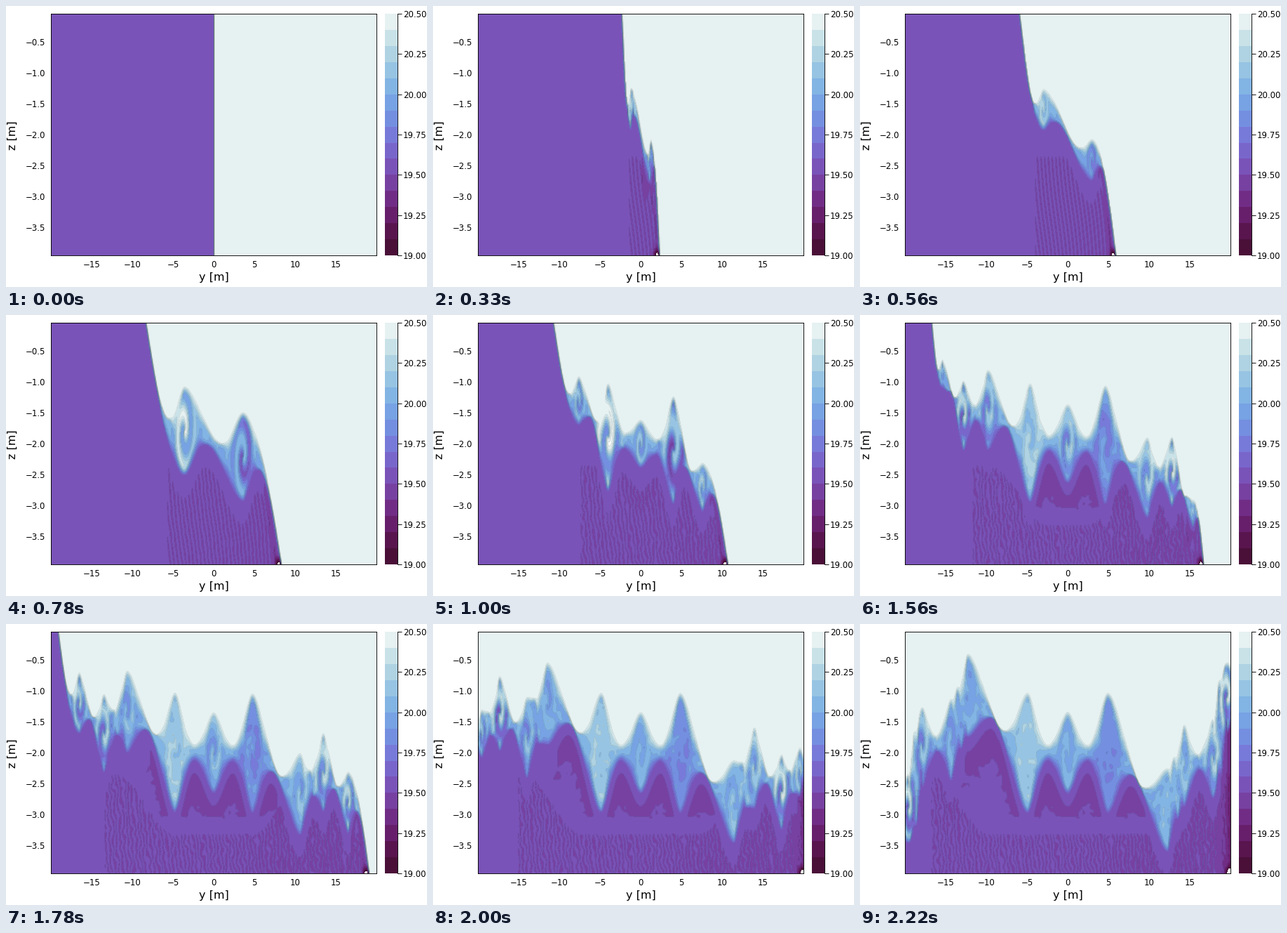
Write a matplotlib script that moves like this. It is 600 px wide and 400 px high and loops after 2330 ms.

```python
import numpy as np
import matplotlib.pyplot as plt
from matplotlib.animation import FuncAnimation
from matplotlib.colors import ListedColormap

FRAMES, LOOP = 21, 2330
W, H, DPI = 600, 400, 100
X0, X1, Y0, Y1 = 64, 528, 11, 355          # plot box in pixels
XC, YC = 296, 183.5                        # centre of point symmetry
SPEED = 13.9                               # front speed, px per frame

bands = ("#4a1038 #59154e #681f6b #712d86 #7741a1 #7a53b8 #7966cb #787ad9 "
         "#748fe0 #77a2e3 #82b4e4 #97c4e3 #afd3e2 #c9e2e8 #e6f1f1").split()
cmap = ListedColormap(bands)
levels = np.linspace(19, 20.5, 16)

# Billows shed by the left front, oldest first; the right ones mirror them.
# drift speed, slow-down time, rise at birth, settled rise, late lift, lift start
billows = [
    (4.0, 6, 36, 0, 0, 20),
    (5.3, 90, 68, 45, 6, 14),
    (7.5, 6, 83, 15, 0, 20),
    (7.5, 6, 100, 40, -20, 18),
    (0.0, 6, 80, 80, -53, 17),
]

xs = np.linspace(X0, X1, 330)
ys = np.linspace(Y0, Y1, 180)
X, Y = np.meshgrid(xs, ys)


def blur(f, passes):
    for _ in range(passes):
        p = np.pad(f, 1, mode="edge")
        f = (p[:-2, 1:-1] + p[2:, 1:-1] + p[1:-1, :-2] + p[1:-1, 2:] + 4 * f) / 8
    return f


grain = blur(np.random.default_rng(4).normal(size=X.shape), 12)
grain /= grain.std()


def smooth(t):
    t = np.clip(t, 0, 1)
    return t * t * (3 - 2 * t)


def grown(size, age):
    return size * (1 - np.exp(-(age + 1) / 2.2))


def vortices(n):
    """Active billows from left to right: x, y, half height, age, core warmth."""
    found = []
    for k, (speed, slow, rise0, rise1, lift, start) in enumerate(billows):
        born = 5 + 3 * k
        if k and n < born:
            continue
        age = max(n - born, 0)
        dist = (35 + 48 * k) * min(1, n / born)
        dist += speed * slow * (1 - np.exp(-age / slow))
        rise = rise1 + (rise0 - rise1) * np.exp(-age / 3) + lift * max(n - start, 0)
        half = grown(62 if k else 88, age)
        warmth = -0.04 if k else 0.17
        for side in (-1, 1):
            found.append((XC + side * dist, YC + side * rise, half, age,
                          -side * warmth))
    if n >= 8:
        found.append((XC, YC, grown(61, n - 8), n - 8, 0))
    return sorted(found)


def upper_edge(n, vs):
    """Top of the mixing layer: crests over billows, troughs on the braids."""
    front = SPEED * n
    x, y, half = vs[0][:3]
    start = XC - front + 2
    pts = [(start, 12), (max(x - 0.35 * half, start + 0.6 * (x - start)),
                         y - 0.3 * half)]
    for (xa, ya, ha, *_), (xb, yb, *_) in zip(vs, vs[1:]):
        dy = yb - ya
        f = 0.5 + min(0.12 + 0.8 * np.exp(-n / 3), 0.4) * np.tanh(dy / 40)
        gap = 14 * np.exp(-(dy / 50) ** 2) + 1.2 * max(0, -dy - 20)
        pts += [(xa, ya - ha), (xa + f * (xb - xa), ya + f * dy - gap)]
    x, y, half = vs[-1][:3]
    pts += [(x, y - half), (max(XC + front, x + 3), 355)]

    px, py = np.array(pts).T
    px = np.maximum.accumulate(px) + 1e-3 * np.arange(len(px))
    last = len(px) - 2
    i = np.clip(np.searchsorted(px, xs) - 1, 0, last)
    t = (xs - px[i]) / np.diff(px)[i]
    c = np.clip(t, 0, 1) * np.pi
    ease = (1 - np.cos(c)) / 2
    ease = np.where(i == 0, np.sin(c / 2), ease)
    ease = np.where(i == last, 1 - np.cos(c / 2), ease)
    ease += np.pi / 2 * (t - np.clip(t, 0, 1))     # straight beyond the fronts
    return py[i] + np.diff(py)[i] * ease


def mixed(n, vs):
    """Temperature inside the layer, with rolled-up billows."""
    m = 20 + 0.025 * grain * smooth((n - 9) / 6)
    for x, y, half, age, warmth in vs:
        u, v = (X - x) / (0.24 * half), (Y - y) / half
        rho, phi = np.hypot(u, v), np.arctan2(v, u)
        amp = 0.36 * min(1, (age + 1) / 4) * np.exp(-max(age - 4, 0) / 4)
        spin = np.cos(phi + 7 * rho - 0.5 * age)
        m += (warmth + amp * spin) * np.exp(-rho ** 4)
    return m


def cold_water(n, low):
    depth = Y - low
    inside = smooth((X - XC + 9.9 * n) / 6)
    calm = smooth((n - 6 - abs(X - XC) / 14) / 6)

    # near-vertical streaks in the deep water
    zone = inside * smooth((Y - 207 - 85 * calm) / 14) * smooth((depth - 22) / 14)
    wave = np.sin(2 * np.pi * (X - 0.1 * Y) / 5.4 + 1.3 * np.sin(Y / 31 + X / 47)
                  + 1.4 * grain * smooth((n - 5) / 6))
    t = 19.535 + zone * (0.04 * wave - 0.03 - 0.025 * smooth((X - 280) / 160))

    # darker water below the braids, rippled further down
    patch = smooth((depth - 8) / 12) * smooth((80 - depth) / 30)
    ripple = np.sin(Y / 3.6 + 1.5 * np.sin(X / 16) + grain) * smooth((depth - 40) / 25)
    t -= inside * calm * smooth((292 - Y) / 30) * (0.055 * patch + 0.03 * ripple)

    # coldest spot at the foot of the right front, later along the wall
    foot = min(XC + SPEED * n, X1 + 2)
    t -= 0.6 * np.exp(-((X - foot + 4) / 5) ** 2 - ((Y - Y1) / 9) ** 2)
    t -= 0.25 * smooth((n - 16) / 4) * np.exp(-(X1 - X) / 7)
    return t


def field(n):
    if n == 0:
        return np.where(X < XC, 19.54, 20.46)
    vs = vortices(n)
    up = upper_edge(n, vs)
    low = np.maximum(2 * YC - up[::-1], up + 6)
    su, sl = np.gradient(up, xs), np.gradient(low, xs)
    p = (Y - up) / np.hypot(1, su)
    q = (low - Y) / np.hypot(1, sl)
    thick = (low - up) / np.hypot(1, np.maximum(abs(su), abs(sl)))
    w = np.clip(thick / 2, 2, 13)

    warm = 20.46
    cold = cold_water(n, low)
    behind = abs(X - XC - SPEED * n + 13) < 13
    cold -= 0.1 * np.exp(-((q + 5) / 3.5) ** 2) * behind
    m = mixed(n, vs)
    t = m + (warm - m) * (1 - smooth(p / w)) + (cold - m) * (1 - smooth(q / w))
    return np.where(p < 0, np.maximum(t, warm - 0.02), t)


def box(x0, y0, x1, y1):
    return [x0 / W, 1 - y1 / H, (x1 - x0) / W, (y1 - y0) / H]


px = 72 / DPI
plt.rcParams.update({"font.family": "DejaVu Sans", "font.size": 11.7 * px,
                     "axes.linewidth": 0.9 * px})
fig = plt.figure(figsize=(W / DPI, H / DPI), dpi=DPI, facecolor="white")

ax = fig.add_axes(box(X0, Y0, X1, Y1))
ax.set(xlim=(-20, 20), ylim=(-3.95, -0.05),
       xticks=range(-15, 16, 5), yticks=np.arange(-3.5, 0, 0.5))
ax.tick_params(length=0)
ax.tick_params(axis="x", pad=7 * px)
ax.tick_params(axis="y", pad=8 * px)
label = dict(size=16 * px, ha="center", va="center")
fig.text(XC / W, 1 - 387 / H, "y [m]", **label)
fig.text(9.5 / W, 1 - 184 / H, "z [m]", rotation=90, **label)

cax = fig.add_axes(box(540, Y0, 558, Y1))
cax.imshow(np.arange(15)[:, None], cmap=cmap, origin="lower", aspect="auto",
           extent=(0, 1, 19, 20.5), interpolation="nearest")
cax.set(xticks=[], yticks=np.arange(19, 20.6, 0.25))
cax.yaxis.tick_right()
cax.yaxis.set_major_formatter("{x:.2f}")
cax.tick_params(axis="y", length=6 * px, width=0.9 * px, pad=2 * px)
cax.spines[["left", "top", "bottom"]].set_visible(False)

ym = np.linspace(-20, 20, len(xs))
zm = np.linspace(-0.05, -3.95, len(ys))
drawn = []


def draw(n):
    while drawn:
        drawn.pop().remove()
    t = field(n)
    drawn.append(ax.contourf(ym, zm, t, levels, cmap=cmap, vmin=19, vmax=20.5))
    drawn.append(ax.contour(ym, zm, t, levels, colors="black",
                            alpha=0.15, linewidths=0.6 * px))
    return drawn


anim = FuncAnimation(fig, draw, frames=FRAMES, interval=LOOP / FRAMES,
                     repeat=True, repeat_delay=0, blit=False)
plt.show()
```
